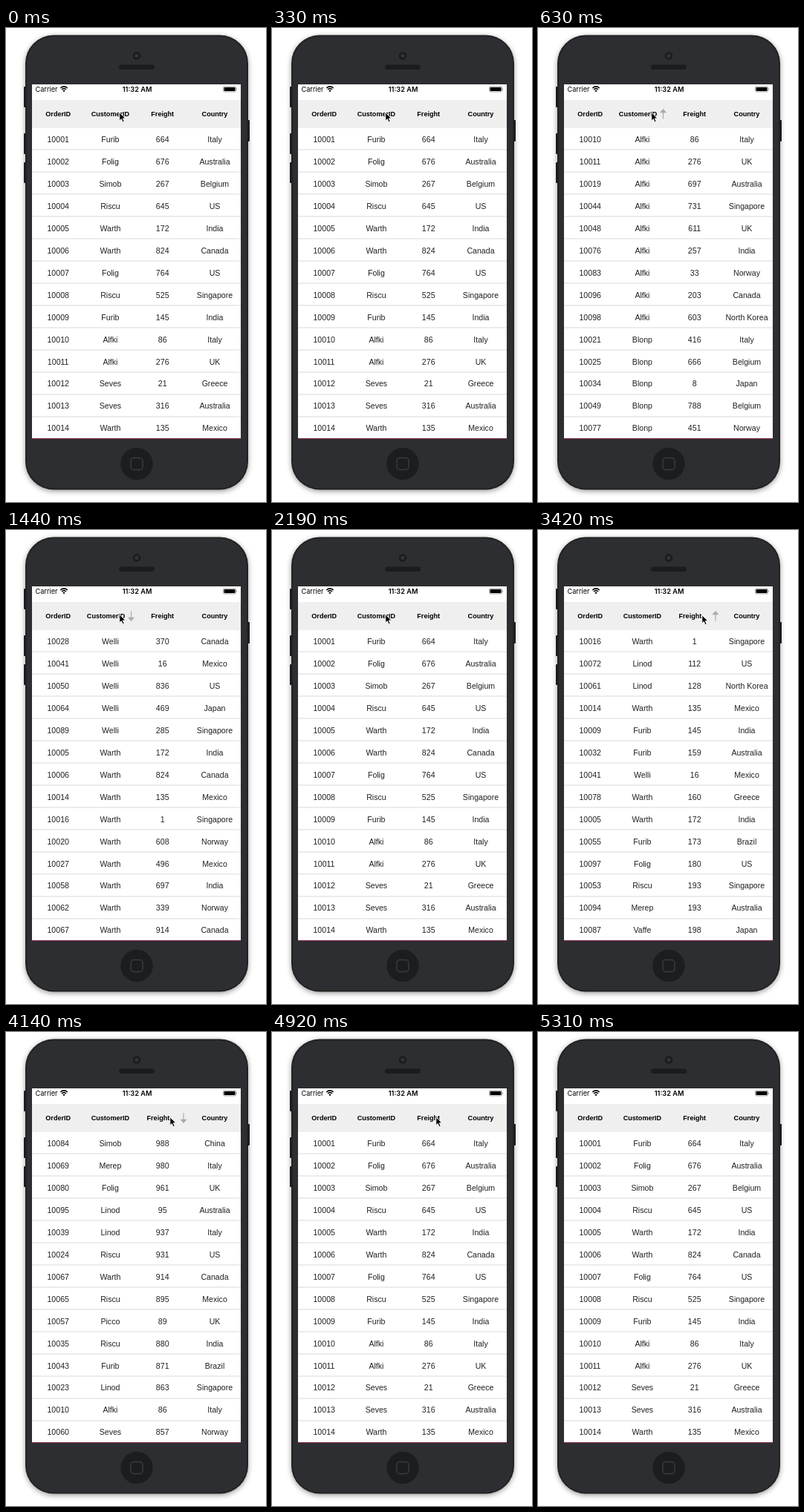
These frames come from a looping animation (350 by 639 pixels, 5580 ms). An HTML page:

```html
<!DOCTYPE html>
<html lang="en">
<head>
<meta charset="utf-8">
<title>Sortable grid</title>
<style>
html, body { margin: 0; width: 100%; height: 100%; overflow: hidden; background: #fff; }
svg { display: block; width: 350px; height: 639px; }
.status { font: 9.2px Inter, sans-serif; }
.head text { font: bold 9.1px "Liberation Sans", sans-serif; fill: #000; text-anchor: middle; }
.rows text { font: 10.6px "Liberation Sans", sans-serif; fill: #202020; text-anchor: middle; }
</style>
</head>
<body>
<svg viewBox="0 0 350 639">
  <defs>
    <filter id="shadow" x="-10%" y="-10%" width="120%" height="120%">
      <feDropShadow dx="0" dy="2" stdDeviation="3.5" flood-color="#000" flood-opacity=".4"/>
    </filter>
  </defs>
  <g fill="#202124">
    <rect x="24" y="79" width="4" height="28" rx="1"/>
    <rect x="24" y="142" width="4" height="28" rx="1"/>
    <rect x="24" y="181" width="4" height="28" rx="1"/>
    <rect x="324" y="124" width="4" height="29" rx="1"/>
  </g>
  <rect x="26" y="9.5" width="300" height="613" rx="38" fill="#202124" filter="url(#shadow)"/>
  <rect x="28" y="11.5" width="296" height="609" rx="36" fill="#2d2e31"/>
  <circle cx="176" cy="37.5" r="5.2" fill="#1a1b1d"/>
  <circle cx="176" cy="37.5" r="2.7" fill="#303236"/>
  <rect x="152" y="49.5" width="48" height="6.5" rx="3.25" fill="#1b1c1e"/>
  <circle cx="176" cy="587.5" r="21.7" fill="#1c1d1f"/>
  <rect x="168" y="579.5" width="16" height="16" rx="4" fill="none" stroke="#3b3c3f" stroke-width="1.4"/>

  <rect x="35" y="76" width="281" height="478" fill="#fff"/>
  <rect x="35" y="97" width="281" height="38" fill="#efefef"/>
  <rect x="35" y="553" width="281" height="1.2" fill="#7d2e4a"/>
  <g class="status">
    <text x="39.5" y="85.6">Carrier</text>
    <text x="176.5" y="85.6" text-anchor="middle" font-weight="600">11:32 AM</text>
  </g>
  <g fill="none" stroke="#000" stroke-width="1.5">
    <path d="M73.3 81 Q78 76.8 82.7 81"/>
    <path d="M75 83 Q78 80.3 81 83"/>
  </g>
  <path d="M76.3 84.4 Q78 82.9 79.7 84.4 L78 86.2Z"/>
  <rect x="292.5" y="79" width="17" height="7" rx="1.6" fill="#fff" stroke="#777" stroke-width=".7"/>
  <rect x="293.5" y="80" width="15" height="5" rx=".8"/>
  <path d="M310.5 81.2 Q312 82.5 310.5 83.8Z" fill="#555"/>

  <g class="head"></g>
  <path id="arrow" d="M0 6.5V-3M-3.3 -2.4L0 -6.2L3.3 -2.4Z" fill="#aaa" stroke="#aaa" stroke-width="1.2"/>
  <g class="rows"></g>
  <path id="cursor" d="M0 0V11L2.5 8.7L4.3 12.9L6.3 12L4.5 7.9H8Z" fill="#000" stroke="#fff" stroke-width=".9"/>
</svg>
<script>
const LOOP = 5580, ROWS = 14, PITCH = 29.97;
const titles = ['OrderID', 'CustomerID', 'Freight', 'Country'];
const centers = [70.2, 140.4, 210.7, 281];
const arrowX = { 1: 168.5, 2: 239 };

const orders = `1 Furib 664 Italy|2 Folig 676 Australia|3 Simob 267 Belgium|4 Riscu 645 US
5 Warth 172 India|6 Warth 824 Canada|7 Folig 764 US|8 Riscu 525 Singapore
9 Furib 145 India|10 Alfki 86 Italy|11 Alfki 276 UK|12 Seves 21 Greece
13 Seves 316 Australia|14 Warth 135 Mexico|16 Warth 1 Singapore|19 Alfki 697 Australia
20 Warth 608 Norway|21 Blonp 416 Italy|23 Linod 863 Singapore|24 Riscu 931 US
25 Blonp 666 Belgium|27 Warth 496 Mexico|28 Welli 370 Canada|32 Furib 159 Australia
34 Blonp 8 Japan|35 Riscu 880 India|39 Linod 937 Italy|41 Welli 16 Mexico
43 Furib 871 Brazil|44 Alfki 731 Singapore|48 Alfki 611 UK|49 Blonp 788 Belgium
50 Welli 836 US|53 Riscu 193 Singapore|55 Furib 173 Brazil|57 Picco 89 UK
58 Warth 697 India|60 Seves 857 Norway|61 Linod 128 North Korea|62 Warth 339 Norway
64 Welli 469 Japan|65 Riscu 895 Mexico|67 Warth 914 Canada|69 Merep 980 Italy
72 Linod 112 US|76 Alfki 257 India|77 Blonp 451 Norway|78 Warth 160 Greece
80 Folig 961 UK|83 Alfki 33 Norway|84 Simob 988 China|87 Vaffe 198 Japan
89 Welli 285 Singapore|94 Merep 193 Australia|95 Linod 95 Australia|96 Alfki 203 Canada
97 Folig 180 US|98 Alfki 603 North Korea`.split(/[|\n]/).map(line => {
  const [id, customer, freight, ...country] = line.split(' ');
  return [String(10000 + +id), customer, freight, country.join(' ')];
});

// start time, sorted column, direction
const steps = [
  [0, 0, 1], [630, 1, 1], [1440, 1, -1], [2190, 0, 1],
  [3420, 2, 1], [4140, 2, -1], [4920, 0, 1]
];

const $ = s => document.querySelector(s);
const head = $('.head'), body = $('.rows'), arrow = $('#arrow'), cursor = $('#cursor');
const label = (x, y, s) => `<text x="${x}" y="${y}">${s}</text>`;

// Values compare as text; equal values keep their order.
function sorted(col, dir) {
  const compare = (a, b) => a[col] < b[col] ? -dir : a[col] > b[col] ? dir : 0;
  return [...orders].sort(compare).slice(0, ROWS);
}

function drawGrid([, col, dir]) {
  head.innerHTML = titles.map((s, i) =>
    label(centers[i] - (col && i === col ? 5.8 : 0), 119.1, s)).join('');
  body.innerHTML = sorted(col, dir).map((row, r) => {
    const line = r ? `<rect x="35" y="${133.5 + r * 30}" width="281" height="1" fill="#d9d9d9"/>` : '';
    return line + row.map((s, i) => label(centers[i], 153.8 + r * PITCH, s)).join('');
  }).join('');
  arrow.style.display = col ? '' : 'none';
  if (col) arrow.setAttribute('transform', `translate(${arrowX[col]} 116) scale(1 ${dir})`);
}

const bezier = (a, b, c, d, s) => {
  const q = 1 - s;
  return q * q * q * a + 3 * q * q * s * b + 3 * q * s * s * c + s * s * s * d;
};
const stepped = (t, start, end, n) =>
  t < start ? 0 : Math.min(n, 1 + Math.floor((t - start) / (end - start) * (n - 1)));

function drawCursor(t) {
  const exit = stepped(t, 5220, 5310, 4);
  const s = stepped(t, 2490, 2820, 9) / 9;
  const x = bezier(152.8, 180, 255, 220.8, s) + exit * 15.5;
  const y = bezier(114, 92, 106, 114.8, s) - exit * 9.4;
  cursor.style.display = exit === 4 ? 'none' : '';
  cursor.setAttribute('transform', `translate(${x} ${y})`);
}

const start = performance.now();
let shown;
function frame() {
  const t = (performance.now() - start) % LOOP;
  const step = steps.findLast(s => t >= s[0]);
  if (step !== shown) drawGrid(shown = step);
  drawCursor(t);
  requestAnimationFrame(frame);
}
frame();
</script>
</body>
</html>
```
